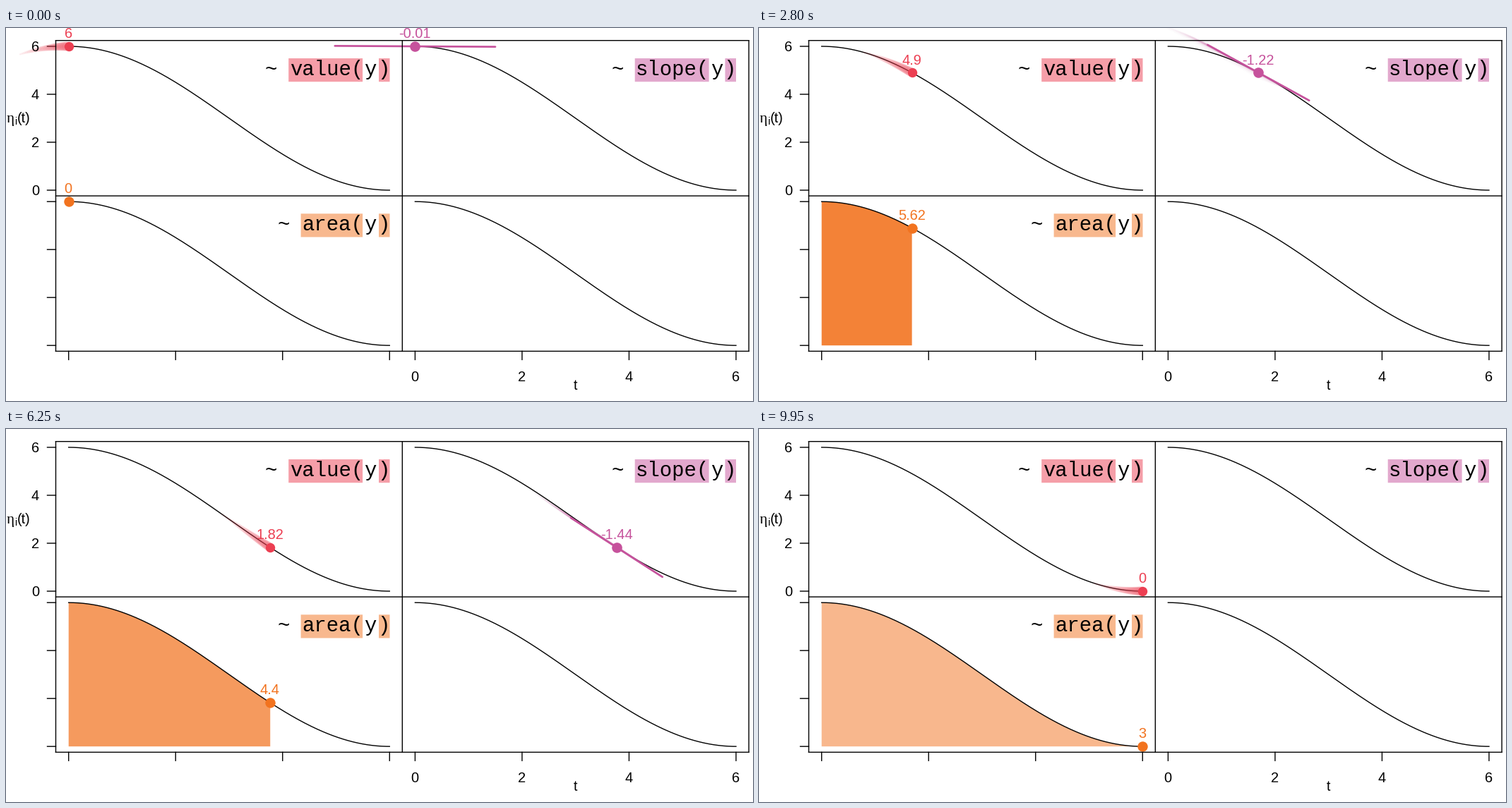
Recreate the animation shown at these times as a matplotlib script. Size 1058 by 529 pixels, loop 10 s.

```python
import numpy as np
import matplotlib.pyplot as plt
from matplotlib.animation import FuncAnimation
from matplotlib.collections import LineCollection
from matplotlib.colors import to_rgba
from matplotlib.patches import Polygon, Rectangle

W, H, DPI = 1058, 529, 100
PT = 72 / DPI                       # points per pixel
FRAMES, INTERVAL = 200, 50
STEP = 6 / (FRAMES - 1)
WAKE = 30                           # copies in each fading trail

RED, PINK, ORANGE = "#ec3f52", "#c6529c", "#f2731f"
LEFT, RIGHT, TOP, BOTTOM = 88.7, 579.4, 230, 450.2   # panel origins
SX, SY = 75.76, 34                  # pixels per data unit
HALF = 1.5                          # half length of the tangent, data units

plt.rcParams["font.family"] = "Liberation Sans"
fig = plt.figure(figsize=(W / DPI, H / DPI), dpi=DPI, facecolor="white")
ax = fig.add_axes([0, 0, 1, 1])
ax.set_xlim(0, W)
ax.set_ylim(H, 0)
ax.axis("off")


def curve(t):
    return 3 + 3 * np.cos(np.pi * t / 6)


def slope(t):
    return (curve(t + STEP) - curve(t)) / STEP


def mean_area(t):
    return 3 + 3 * np.sinc(t / 6) if t > 0 else 0


def place(t, y, x0, y0):
    return x0 + SX * np.asarray(t), y0 - SY * np.asarray(y)


def line(xs, ys, width=1.4, color="black", z=2):
    return ax.plot(xs, ys, color=color, lw=width * PT, zorder=z, snap=False)[0]


def write(x, y, s, size=20, color="black", ha="center", z=6, **kw):
    return ax.text(x, y, s, fontsize=size * PT, color=color, ha=ha,
                   va="baseline", zorder=z, **kw)


def dot(color, size):
    return ax.plot([], [], "o", color=color, ms=size * PT, mew=0, zorder=5,
                   snap=False)[0]


def formula(right, base, name, color):
    """Write '~ name(y)' with tinted boxes behind the function call."""
    adv = 17.4
    start = right - 38.3 - adv * (len(name) + 1)
    tint = to_rgba(color, 0.5)
    top = base - 24
    for x, w in ((start - 0.6, right - 37.8 - start), (right - 15.5, 15.5)):
        ax.add_patch(Rectangle((x, top), w, 33.2, fc=tint, lw=0, zorder=1,
                               snap=False))
    runs = ((start - 2 * adv + 0.8, "~"), (start + 0.8, name + "("),
            (right - 36, "y"), (right - 17.4, ")"))
    for x, s in runs:
        write(x, base, s, 29, ha="left", family="Liberation Mono")


# Frames lie over the moving labels; axes and static text
x_edges, y_edges = (70.5, 561.3, 1052.1), (17.7, 238.1, 458.4)
for x in x_edges:
    line([x, x], [y_edges[0], y_edges[-1]], z=7)
for y in y_edges:
    line([x_edges[0], x_edges[-1]], [y, y], z=7)
for v in (0, 2, 4, 6):
    for y0 in (TOP, BOTTOM):
        line([58.5, 70.5], [y0 - SY * v] * 2)
    for x0 in (LEFT, RIGHT):
        line([x0 + SX * v] * 2, [458.4, 470.4])
    write(47, TOP - SY * v + 7, str(v), ha="right")
    write(RIGHT + SX * v - 0.4, 501, str(v))
write(807, 513, "t")
write(1, 134, "η", 21, ha="left", family="Liberation Serif")
write(12.3, 137, "i", 14, ha="left")
write(15.8, 134, "(t)", ha="left")

formula(543.5, 67, "value", RED)
formula(1034, 67, "slope", PINK)
formula(543.5, 287.3, "area", ORANGE)

grid = np.linspace(0, 6, 201)
for x0 in (LEFT, RIGHT):
    for y0 in (TOP, BOTTOM):
        line(*place(grid, curve(grid), x0, y0))

# Moving parts; trails run from the oldest copy to the newest
age = np.arange(WAKE, 0, -1)
fresh = 1 - age / (WAKE + 1)


def fade(color, alpha):
    return [to_rgba(color, a) for a in alpha]


area = ax.add_patch(Polygon([(0, 0)] * 3, fc=ORANGE, lw=0, zorder=1,
                            snap=False))
red_wake = ax.scatter(np.zeros(WAKE), np.zeros(WAKE),
                      s=((2 + 11.5 * fresh) * PT) ** 2,
                      c=fade(RED, 0.09 + 0.12 * fresh), linewidths=0,
                      zorder=3, snap=False)
pink_wake = LineCollection([], colors=fade(PINK, 0.07 * fresh),
                           linewidths=(0.8 + 1.9 * fresh) * PT, zorder=3)
ax.add_collection(pink_wake)
tangent = line([], [], 2.7, PINK, 4)
tangent.set_solid_capstyle("round")

red_dot, pink_dot, orange_dot = dot(RED, 13.4), dot(PINK, 14.6), dot(ORANGE, 14.4)
red_text, pink_text, orange_text = (write(0, 0, "", color=c)
                                    for c in (RED, PINK, ORANGE))


def mark(point, label, x, y, value):
    point.set_data([x], [y])
    label.set_position((x - 0.4, y - 11.8))
    label.set_text(f"{round(float(value), 2) + 0:g}")


def draw_slope(t, past):
    s = slope(t)
    x, y = place(t, curve(t), RIGHT, TOP)
    mark(pink_dot, pink_text, x, y, s)
    run = HALF / np.hypot(1, s)
    dx, dy = SX * run, -SY * s * run
    tangent.set_data([x - dx, x + dx], [y - dy, y + dy])
    # older copies slide back along the curve, keeping the current angle
    px, py = place(past, curve(past), RIGHT, TOP)
    pink_wake.set_segments([
        [(a - dx, b - dy), (a + dx, b + dy)] if u >= 0 else [(x, y), (x, y)]
        for u, a, b in zip(past, px, py)])


def update(k):
    t = k * STEP
    past = t - age * STEP
    x, y = place(t, curve(t), LEFT, TOP)
    mark(red_dot, red_text, x, y, curve(t))
    red_wake.set_offsets(np.column_stack(place(past, curve(past), LEFT, TOP)))

    mark(orange_dot, orange_text, x, y + BOTTOM - TOP, mean_area(t))
    ts = np.linspace(0, t, 120)
    edge = np.column_stack(place(ts, curve(ts), LEFT, BOTTOM))
    area.set_xy(np.vstack([(LEFT, BOTTOM), edge, (x, BOTTOM)]))
    area.set_alpha(1 - 0.49 * (k / (FRAMES - 1)) ** 1.2)

    # the forward difference does not exist at the last step
    has_slope = k < FRAMES - 1
    for part in (pink_dot, pink_text, pink_wake, tangent):
        part.set_visible(has_slope)
    if has_slope:
        draw_slope(t, past)
    return []


anim = FuncAnimation(fig, update, frames=FRAMES, interval=INTERVAL,
                     init_func=lambda: [], repeat=True, repeat_delay=0)
plt.show()
```
